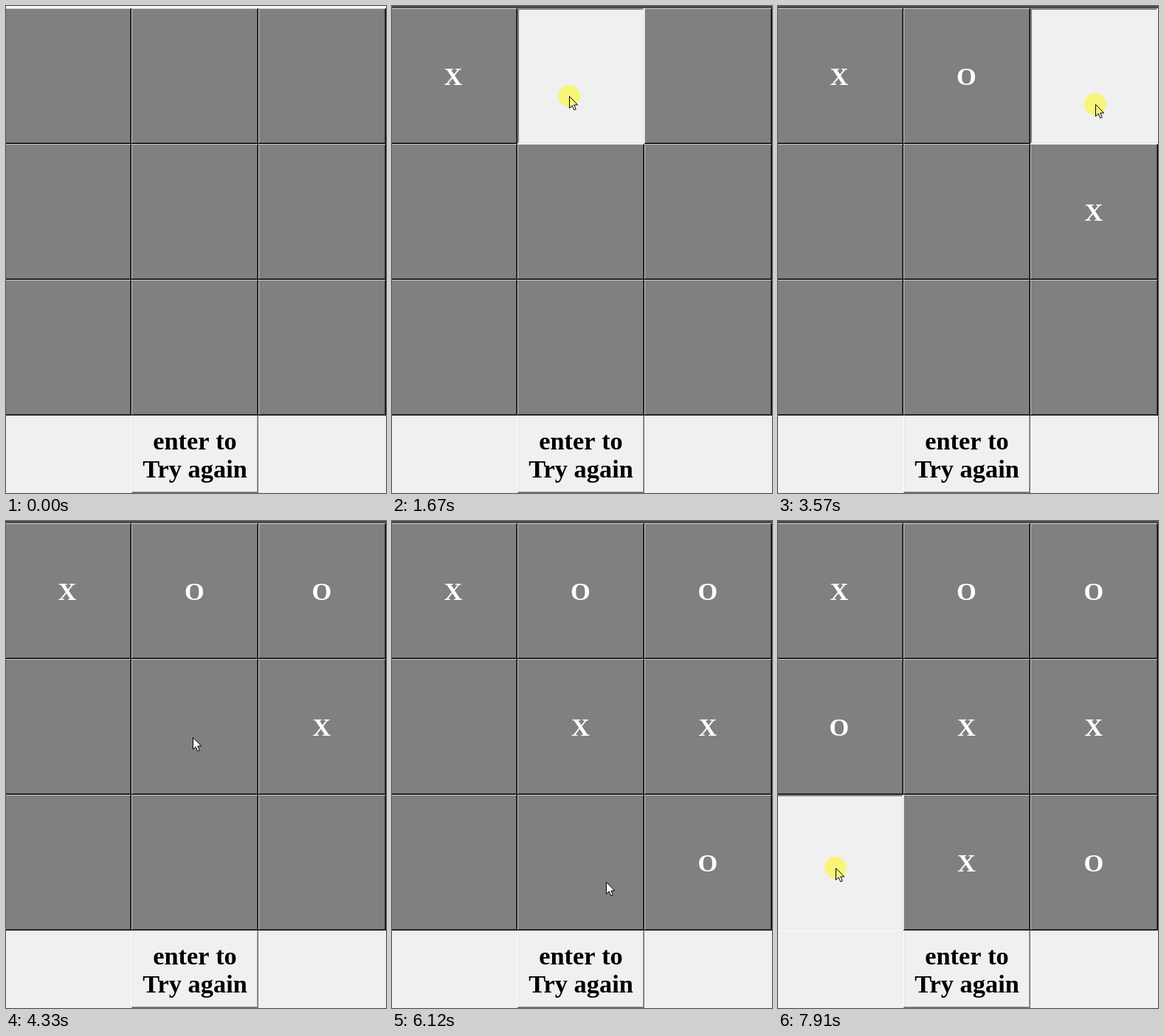
Write an HTML page with a canvas that moves like this. It is 515 px wide and 660 px high and loops after 8 s.

```html
<!DOCTYPE html>
<html lang="en">
<head>
<meta charset="utf-8">
<title>Noughts and crosses</title>
<style>
  html, body { margin: 0; width: 100%; height: 100%; overflow: hidden; background: #f0f0ef; }
  canvas { display: block; }
</style>
</head>
<body>
<canvas id="stage" width="515" height="660"></canvas>
<script>
const ctx = document.getElementById('stage').getContext('2d');
const LOOP = 8000;
const TICK = 80;   // the pointer is redrawn this often
const HOLD = 90;   // how long a click lasts
const PALE = '#f0f0ef';

const colX = c => Math.round(-3 + 172.5 * c);
const rowY = r => 3 + 184 * r;

// Where the pointer stops, when it gets there and when it clicks
const stops = [
  { at: 280, x: 390, y: 611 },
  { at: 750, x: 83, y: 88, press: 980 },
  { at: 1520, x: 240, y: 122, press: 1670 },
  { at: 2000, x: 286, y: 310 },
  { at: 2450, x: 394, y: 154 },
  { at: 2700, x: 437, y: 274, press: 2850 },
  { at: 3170, x: 430, y: 133, press: 3570 },
  { at: 4030, x: 253, y: 293, press: 4410 },
  { at: 4810, x: 483, y: 470 },
  { at: 5040, x: 451, y: 460, press: 5190 },
  { at: 6120, x: 290, y: 489, press: 6200 },
  { at: 6840, x: 78, y: 308, press: 6900 },
  { at: 7530, x: 73, y: 485 },
  { at: 7840, x: 78, y: 470, press: 7910 }
];

// The clicked cell follows from the pointer's place; the players alternate
const clicks = stops.filter(s => s.press).map((s, i) => ({
  down: s.press,
  up: s.press + HOLD,
  cell: Math.floor((s.x + 3) / 172.5) + 3 * Math.floor((s.y - 3) / 184),
  mark: 'XO'[i % 2]
}));

const ease = p => p * p * (3 - 2 * p);
const mix = (a, b, p) => Math.round(a + (b - a) * p);

function pointerAt(t) {
  let { x, y } = stops[0];
  for (let i = 1; i < stops.length; i++) {
    const from = stops[i - 1], to = stops[i];
    const go = (from.press ? from.press + HOLD : from.at) + TICK;
    if (t < go) break;
    const steps = Math.round((to.at - go) / TICK) + 1;
    const done = t >= to.at ? steps : Math.min(Math.floor((t - go) / TICK) + 1, steps);
    const p = ease(done / steps);
    x = mix(from.x, to.x, p);
    y = mix(from.y, to.y, p);
  }
  return [x, y];
}

function rect(x, y, w, h, color) {
  ctx.fillStyle = color;
  ctx.fillRect(x, y, w, h);
}

// Two-pixel bevel; colours run outer and inner top-left, then inner and outer bottom-right
function button(x, y, w, h, face, [tl, tl2, br2, br]) {
  rect(x, y, w, h, br);
  rect(x, y, w - 1, h - 1, tl);
  rect(x + 1, y + 1, w - 2, h - 2, br2);
  rect(x + 1, y + 1, w - 3, h - 3, tl2);
  rect(x + 2, y + 2, w - 4, h - 4, face);
}

const RAISED = ['#d0d0d0', '#808080', '#3c3c3c', '#060606'];
const SUNKEN = ['#a0a0a0', '#696969', '#e3e3e3', '#ffffff'];
const PLAIN = ['#ffffff', '#e3e3e3', '#a0a0a0', '#696969'];

function label(text, x, y, color) {
  ctx.fillStyle = color;
  ctx.fillText(text, x, y);
}

function drawCell(i, pressed, mark) {
  const c = i % 3, r = Math.floor(i / 3);
  const x = colX(c), y = rowY(r), w = colX(c + 1) - x;
  button(x, y, w, 184, pressed ? '#f0f0f0' : '#808080', pressed ? SUNKEN : RAISED);
  if (mark) label(mark, x + w / 2 - 0.5, y + 104, '#ffffff');
}

const arrow = new Path2D('M.5 .5V16.5L4.2 13L6.8 18.8L9.3 17.8L6.8 12H11.7Z');

function drawPointer(x, y, pressed) {
  ctx.save();
  ctx.translate(x, y);
  ctx.fillStyle = '#ffffff';
  ctx.fill(arrow);
  if (pressed) {
    ctx.fillStyle = '#f7f67a';
    ctx.beginPath();
    ctx.arc(0, 0, 15, 0, Math.PI * 2);
    ctx.fill();
  }
  ctx.strokeStyle = '#000000';
  ctx.lineWidth = 1;
  ctx.stroke(arrow);
  ctx.restore();
}

function draw(t) {
  rect(0, 0, 515, 660, PALE);
  rect(0, 0, 515, 3, t < clicks[0].down ? '#f8f8f8' : '#484848');
  ctx.font = 'bold 34.4px "Liberation Serif", serif';
  ctx.textAlign = 'center';

  const marks = [];
  let held = -1;
  for (const { down, up, cell, mark } of clicks) {
    if (t >= up) marks[cell] = mark;
    else if (t >= down) held = cell;
  }
  for (let i = 0; i < 9; i++) drawCell(i, i === held, marks[i]);

  button(colX(1), rowY(3), 172, 105, PALE, PLAIN);
  label('enter to', 256, 601, '#000000');
  label('Try again', 256, 639, '#000000');

  if (t >= stops[0].at) drawPointer(...pointerAt(t), held >= 0);
}

const begin = performance.now();
function tick() {
  draw((performance.now() - begin) % LOOP);
  requestAnimationFrame(tick);
}
tick();
</script>
</body>
</html>
```
